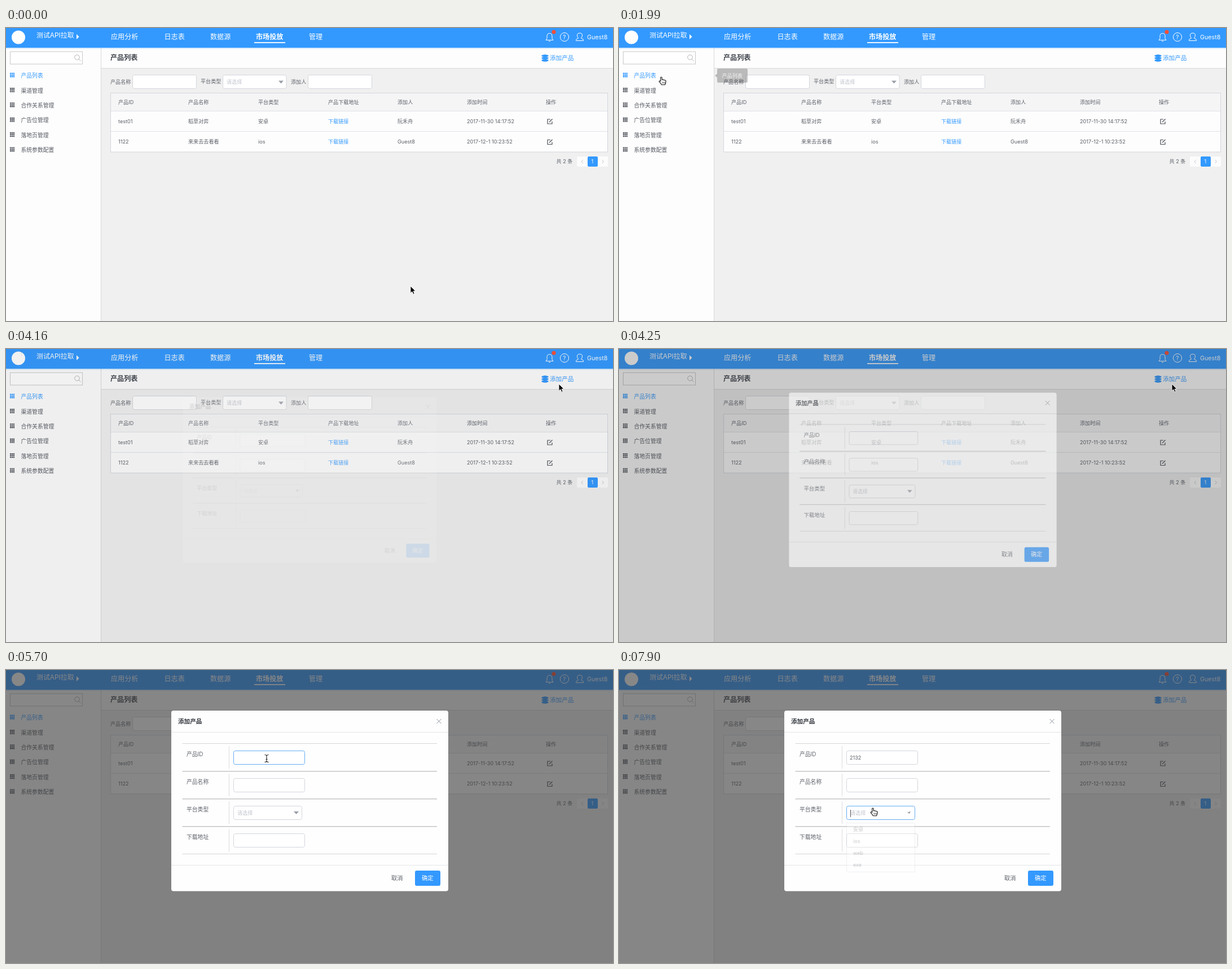
Animation, 1076 px wide and 520 px high, one loop 7990 ms. Source, as an HTML page:

```html
<!DOCTYPE html>
<html lang="zh-CN">
<head>
<meta charset="utf-8">
<title>产品列表</title>
<style>
  html, body { margin: 0; width: 100%; height: 100%; overflow: hidden; }
  svg { display: block; width: 100%; height: 100%; background: #f0f0f0; }
  text { font-family: Inter, "Noto Sans CJK SC", "Noto Sans CJK", sans-serif; white-space: pre; }
  .blue { fill: #3399ff; }
  .light { fill: #fff; }
  .lightLine { fill: none; stroke: #fff; }
</style>
</head>
<body>
<svg id="stage" viewBox="0 0 1076 520"></svg>
<script>
const LOOP = 7990;
const INK = '#5c6068', PALE = '#c0c4cc', BORDER = '#d3d6dc';

// Drawing helpers; text is placed by its left edge and vertical middle.
const text = (x, y, size, label, attrs = `fill="${INK}"`) =>
  `<text x="${x}" y="${y + size * 0.37}" font-size="${size}" ${attrs}>${label}</text>`;
const rect = (x, y, w, h, attrs) => `<rect x="${x}" y="${y}" width="${w}" height="${h}" ${attrs}/>`;
const path = (d, attrs) => `<path d="${d}" ${attrs}/>`;
const line = (d, color = BORDER, width = 1) => path(d, `fill="none" stroke="${color}" stroke-width="${width}"`);
const field = (x, y, w, id = '') => rect(x, y, w, 24, `${id && `id="${id}"`} rx="3" fill="#fff" stroke="${BORDER}"`);
const group = (id, content) => `<g id="${id}">${content}</g>`;
const each = (list, draw) => list.map(draw).join('');

const nav = [[186, '应用分析'], [280.5, '日志表'], [362, '数据源'], [443, '市场投放'], [537, '管理']];
const menu = ['产品列表', '渠道管理', '合作关系管理', '广告位管理', '落地页管理', '系统参数配置'];
const columns = [199, 323, 447, 571, 694, 817, 957];
const rows = [
  [131.5, ['产品ID', '产品名称', '平台类型', '产品下载地址', '添加人', '添加时间', '操作']],
  [165.5, ['test01', '稻草对弈', '安卓', '', '阮禾舟', '2017-11-30 14:17:52']],
  [202, ['1122', '来来去去看看', 'ios', '', 'Guest8', '2017-12-1 10:23:52']],
];

const gridIcon = (x, y) => {
  let d = '';
  for (let i = 0; i < 9; i++) d += `M${x + i % 3 * 2.9} ${y + Math.floor(i / 3) * 2.9}h2.3v2.3h-2.3z`;
  return d;
};

const header = () => [
  rect(0, 35, 1076, 2, 'class="blue" opacity=".2"'),
  rect(0, 0, 1076, 35, 'class="blue"'),
  '<circle cx="22" cy="16.5" r="12" class="light"/>',
  text(54, 13, 11.9, '测试API拉取', 'class="light"'),
  path('M125 11l4.5 4.5l-4.5 4.5z', 'class="light"'),
  each(nav, ([x, label], i) => text(x, 16, 12.1, label, `class="light" font-weight="${i === 3 ? 600 : 400}"`)),
  rect(440, 25, 55, 1.8, 'class="light"'),
  path('M957 21.5h13l-2-3v-4q0-5-4.5-5t-4.5 5v4zM962 23.5h3', 'class="lightLine"'),
  '<circle cx="971" cy="7" r="3.6" fill="#f54e36"/>',
  '<circle cx="990" cy="16" r="7.6" class="lightLine"/>',
  text(987.2, 16, 10, '?', 'class="light"'),
  path('M1014.5 18q-2-2.5-2-5q0-4 4.5-4t4.5 4q0 2.5-2 5l3.5 2q.8 1 .5 2.5h-13q-.3-1.5.5-2.5z', 'class="lightLine"'),
  text(1030, 16, 10.7, 'Guest8', 'class="light"'),
].join('');

const sidebar = () => [
  rect(0, 35, 168, 485, 'fill="#fdfdfd"'),
  line('M168.5 35V520', '#d9d9d9'),
  rect(7.5, 42, 128, 22, 'fill="#fff" stroke="#c8c8c8"'),
  line('M130.3 52a4.3 4.3 0 1 1-8.6 0a4.3 4.3 0 1 1 8.6 0M129 55.2l3.6 3.4', '#b5b5b5'),
  each(menu, (label, i) => {
    const y = 84.5 + i * 26.4, attrs = i ? 'fill="#555961"' : 'class="blue"';
    return text(26.5, y, 9.8, label, attrs) + path(gridIcon(7, y - 5), attrs);
  }),
].join('');

const content = () => [
  rect(169, 35, 907, 36.5, 'fill="#fdfdfd"'),
  line('M169 71.5H1076', '#d9d9d9'),
  text(185, 52.5, 12.1, '产品列表', 'fill="#3f444c" font-weight="600"'),
  each([47, 51, 55], y => path(`M949.5 ${y + 1.6}q6-3.2 12 0v1.6q-6 3-12 0z`, 'class="blue"')),
  text(964, 53, 10.6, '添加产品', 'class="blue"'),
  text(185, 95.5, 9.1, '产品名称'), field(224.5, 83.5, 113),
  text(345, 95, 9.1, '平台类型'), field(384.5, 83.5, 112.5),
  text(391, 96, 9.1, '请选择', `fill="${PALE}"`),
  path('M483 93.5h9l-4.5 5z', 'fill="#999ea8"'),
  text(505, 95.5, 9.1, '添加人'), field(535.5, 83.5, 113),
  rect(185.5, 115.5, 881, 104.5, `fill="#fdfdfd" stroke="${BORDER}"`),
  rect(186, 116, 880, 31, 'fill="#f5f5f6"'),
  line('M186 147.5H1066M186 183.5H1066', '#dfe2e8'),
  each(rows, ([y, cells]) => each(cells, (label, i) => text(columns[i], y, 9.1, label))),
  each([165.5, 202], y => text(571, y, 9.1, '下载链接', 'class="blue"') +
    line(`M965 ${y - 3.5}h-5v8h8v-4M963 ${y + 1.5}l5.5-5.5`, '#4c5057', 1.2)),
  text(975.5, 237, 9.1, '共 2 条'),
  rect(1012, 228, 55, 18, 'rx="2" fill="#fcfcfc"'),
  line('M1023 234l-3 3l3 3M1056.5 234l3 3l-3 3', PALE),
  rect(1031, 228, 18, 18, 'rx="2" class="blue"'),
  text(1037.4, 237, 9, '1', 'class="light"'),
].join('');

const modal = () => [
  rect(293, 72, 491, 320.5, 'rx="4" fill="#fefefe"'),
  text(305, 91, 10.6, '添加产品', 'fill="#33373e" font-weight="600"'),
  line('M763.5 87l8 8m0-8l-8 8', '#8f949c'),
  line('M293 110.5H784M293 346.5H784', '#e3e5e9'),
  line('M312.5 130.5H764M312.5 326.5H764', '#d6d6d6'),
  line('M312.5 179.7H764M312.5 228.7H764M312.5 277.7H764', '#c6c6c6', 1.4),
  each(['产品ID', '产品名称', '平台类型', '下载地址'], (label, i) => {
    const y = 149.5 + i * 49.1;
    return text(320, y, 9.8, label) + line(`M395.5 ${y - 14.5}v40`, '#dcdcdc');
  }),
  field(403.5, 143.5, 126, 'idField'), field(403.5, 192.5, 126, 'nameField'),
  field(403.5, 241.5, 121, 'typeField'), field(403.5, 290.5, 126),
  text(409, 155.5, 9.1, '', `id="typed" fill="${INK}"`),
  text(410, 254, 9.1, '请选择', `fill="${PALE}"`),
  path('M-4.5-2.5h9l-4.5 5z', 'id="triangle" fill="#999ea8"'),
  rect(0, 0, 0.9, 13, 'id="caret" fill="#444"'),
  text(683, 369, 10.3, '取消'),
  rect(725, 356, 45, 27, 'rx="3" class="blue"'),
  text(737, 369.5, 10.3, '确定', 'class="light"'),
  group('options',
    rect(403.5, 271.5, 121, 87, 'rx="2" fill="#fff" stroke="#ccd0d8"') +
    each(['安卓', 'ios', 'web', 'exe'], (label, i) => text(415, 283 + i * 20.8, 9.1, label))),
].join('');

const tooltip =
  path('M176 72h50q2 0 2 2v21q0 2-2 2h-50q-2 0-2-2v-7l-4-3.5l4-3.5v-7q0-2 2-2z', 'fill="#303133"') +
  text(182.5, 84.5, 9.1, '产品列表', 'fill="#fff"');

const pointers = {
  arrow: path('M0 0v12.5l2.9-2.7l2 4.6l2.2-1l-2-4.4h3.9z', 'fill="#000" stroke="#fff" stroke-width=".9"'),
  hand: path('M-1.3 7.5V1.2q0-1.2 1.2-1.2t1.3 1.2v3.6q1.7-.8 2.4.4q1.5-.6 2.3.6q2.2-.4 2.2 1.7q0 3-1.6 6.3h-6q-1.5-2.7-4-5.1q-.8-1.1.2-1.8q1-.5 2 .6z',
    'fill="#fff" stroke="#111" stroke-width="1.1"') + line('M2 8.5v3M4 8.5v3M6 8.5v3', '#111', .7),
  beam: line('M-3.5-6.5q3 0 3.5 1.5q.5-1.5 3.5-1.5M0-5v10M-3.5 6.5q3 0 3.5-1.5q.5 1.5 3.5 1.5M-1.5 1.5h3', '#222', 1.1),
};

document.getElementById('stage').innerHTML = sidebar() + content() + header() +
  rect(0, 0, 1076, 520, 'id="mask" fill="#373737"') + group('modal', modal()) + group('tooltip', tooltip) +
  group('pointer', each(Object.entries(pointers), ([kind, shape]) => group(kind, shape)));
const $ = id => document.getElementById(id);
const set = (id, attrs) => { for (const name in attrs) $(id).setAttribute(name, attrs[name]); };

// The screen refreshes in bursts: [first, last, count].
const bursts = [[0, 0, 1], [350, 350, 1], [530, 1270, 9], [1360, 2080, 9], [2170, 2350, 3], [2800, 3550, 9],
  [3640, 3980, 5], [4160, 4250, 2], [4460, 4460, 1], [4630, 4630, 1], [4810, 5340, 7], [5700, 5700, 1],
  [6240, 6680, 6], [6860, 7030, 3], [7200, 7900, 9]];
const refreshes = bursts.flatMap(([first, last, count]) =>
  Array.from({ length: count }, (_, i) => first + (count > 1 ? (last - first) * i / (count - 1) : 0)));

const pointerPath = [[0, 717, 458, 'arrow'], [350, 565, 313, 'arrow'], [530, 520, 262, 'arrow'], [900, 310, 110, 'arrow'],
  [1090, 330, 25, 'arrow'], [1270, 369, 53, 'arrow'], [1360, 325, 60, 'arrow'], [1720, 110, 84, 'arrow'],
  [1810, 75, 87, 'hand'], [2790, 75, 87, 'hand'], [2800, 95, 98, 'arrow'], [3080, 420, 162, 'arrow'],
  [3550, 972, 78, 'arrow'], [3980, 980, 62, 'arrow'], [4250, 980, 62, 'arrow'], [4460, 839, 77, 'arrow'],
  [4630, 546, 110, 'arrow'], [4810, 530, 122, 'arrow'], [5160, 466, 152, 'beam'], [5340, 462, 157, 'beam'],
  [6500, 462, 157, 'beam'], [6680, 455, 192, 'beam'], [7200, 455, 196, 'beam'], [7460, 452, 230, 'arrow'],
  [7640, 450, 245, 'hand']];

// Linear interpolation of [time, ...values]; non-numbers hold until the next key.
function track(t, keys) {
  const next = keys.findIndex(key => key[0] > t);
  if (next === 0) return keys[0].slice(1);
  if (next < 0) return keys[keys.length - 1].slice(1);
  const a = keys[next - 1], b = keys[next], p = (t - a[0]) / (b[0] - a[0]);
  return a.slice(1).map((v, i) => typeof v === 'number' ? v + (b[i + 1] - v) * p : v);
}

function focusField(id, amount) {
  const mix = (a, b) => Math.round(a + (b - a) * amount);
  set(id, { stroke: `rgb(${mix(211, 100)},${mix(214, 172)},${mix(220, 243)})` });
}

function caretAt(t) {
  if (t >= 5250 && t < 5700) return [409, 149];
  if (t >= 6240 && t < 6600) return [410 + $('typed').getComputedTextLength(), 149];
  if (t >= 6680 && t < 7200) return [409, 198];
  if (t >= 7800) return [410, 248];
  return [-20, -20];
}

function render(now) {
  const t = refreshes.findLast(time => time <= now + 0.01);

  const [x, y, kind] = track(t, pointerPath);
  set('pointer', { transform: `translate(${x} ${y})` });
  for (const name in pointers) set(name, { display: name === kind ? 'inline' : 'none' });

  const [tip] = track(t, [[1900, 0], [1990, .28], [2080, .62], [2170, .9], [2800, .9], [3050, 0]]);
  set('tooltip', { opacity: tip });

  const [scale, opacity, dim] = track(t, [[4159, .9, 0, 0], [4160, .916, .12, .07], [4250, .966, .62, .26], [4460, 1, 1, .6]]);
  set('modal', { opacity, transform: `translate(538.5 232) scale(${scale}) translate(-538.5 -232)` });
  set('mask', { 'fill-opacity': dim });

  focusField('idField', track(t, [[5160, 0], [5340, 1], [6860, .95], [7030, 0]])[0]);
  focusField('nameField', track(t, [[6592, 0], [6860, 1], [7700, 1], [7900, 0]])[0]);
  focusField('typeField', track(t, [[7640, 0], [7812, 1]])[0]);
  $('typed').textContent = '2132'.slice(0, Math.max(0, Math.floor((t - 6240) / 88 + 1.01)));
  const [caretX, caretY] = caretAt(t);
  set('caret', { x: caretX, y: caretY });

  const [open] = track(t, [[7812, 0], [7900, 1]]);
  set('options', { opacity: open * .32 });
  set('triangle', { transform: `translate(514.5 253.5) rotate(${-22 * open}) scale(${1 - .3 * open})` });
}

function tick() {
  render(performance.now() % LOOP);
  requestAnimationFrame(tick);
}
tick();
</script>
</body>
</html>
```
